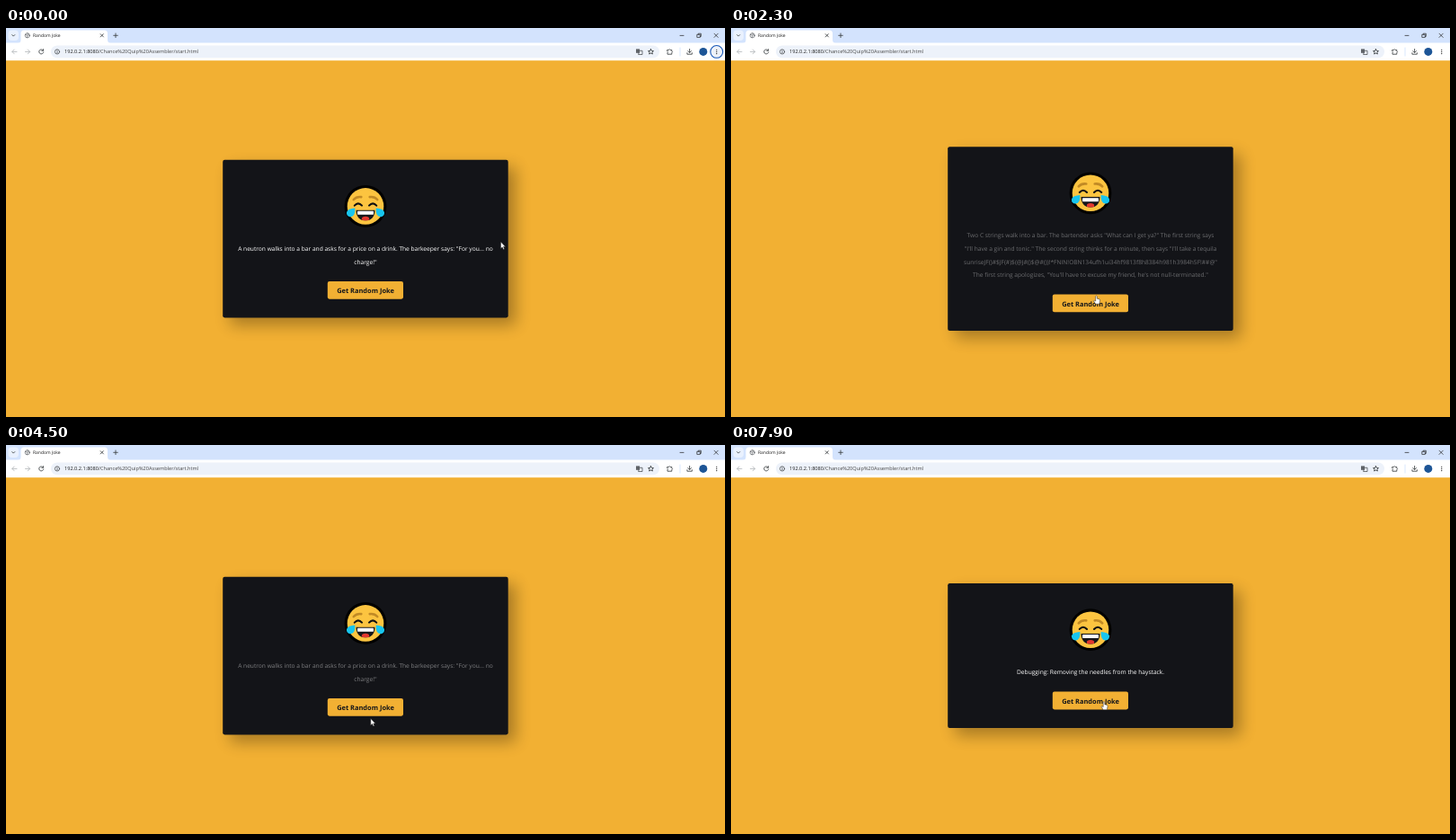
Animation, 800 px wide and 433 px high, one loop 8 s. Source, as an HTML page:

```html
<!DOCTYPE html>
<html lang="en">
<head>
<meta charset="utf-8">
<title>Random Joke</title>
<style>
  html, body { margin: 0; width: 100%; height: 100%; overflow: hidden; background: #f2b033; }
  svg { display: block; width: 100vw; height: 100vh; }
  text { font-family: "Open Sans", "Noto Sans", sans-serif; text-rendering: geometricPrecision; }
  .joke { font-size: 6.63px; fill: #fff; text-anchor: middle; }
  .label { font-size: 7.45px; font-weight: 700; fill: #15161a; text-anchor: middle; }
  .icon { fill: none; stroke: #3c4043; stroke-width: .85; stroke-linecap: round; stroke-linejoin: round; }
</style>
</head>
<body>
<svg viewBox="0 0 800 433" preserveAspectRatio="none">
  <defs>
    <filter id="soft" x="-20%" y="-30%" width="140%" height="160%"><feGaussianBlur stdDeviation="8.3"/></filter>
    <clipPath id="mouthClip"><path d="M389.5 4H410.5C410.5 12 406 16 400 16S389.5 12 389.5 4Z"/></clipPath>
  </defs>
  <rect width="800" height="433" fill="#f2b033"/>

  <!-- Browser window -->
  <rect width="800" height="17" fill="#d3e3fd"/>
  <rect y="16.5" width="800" height="19.7" fill="#fff"/>
  <rect x="2.5" y="2.5" width="11.5" height="11.5" rx="4" fill="#e9f1fe"/>
  <path d="M12.5 17Q16.5 17 16.5 13V6Q16.5 2.5 20 2.5H109.5Q113 2.5 113 6V13Q113 17 117 17Z" fill="#fff"/>
  <text x="30" y="10.4" font-size="5" fill="#1f1f1f">Random Joke</text>
  <rect x="50" y="19.6" width="677" height="13.6" rx="6.8" fill="#edf2fa"/>
  <text x="65" y="28.4" font-size="5.6" fill="#474747"><tspan fill="#1f1f1f">192.0.2.1:8080</tspan>/Chance%20Quip%20Assembler/start.html</text>
  <g class="icon">
    <path d="M6.8 7.6L8.3 9.1L9.8 7.6"/>
    <g stroke="#5f6368" stroke-width=".7"><circle cx="23.8" cy="8.3" r="2.6"/><path d="M21.4 7.5L24 8L23.4 10.6M24 5.8L24.4 7.3L26.2 8.3"/></g>
    <path d="M105.2 6.7L108.4 9.9M108.4 6.7L105.2 9.9M119.7 8.3H124.3M122 6V10.6"/>
    <g stroke="#222" stroke-width=".7">
      <path d="M750 8.4H754M788 6.2L792.2 10.4M792.2 6.2L788 10.4"/>
      <path d="M769.2 7.3H772.3V10.4H769.2ZM770.2 7.2V6.2H773.3V9.4H772.4"/>
    </g>
    <path stroke="#b4b7ba" d="M12 26.4H7M9.2 24L6.8 26.4L9.2 28.8M21.5 26.4H26.5M24.3 24L26.7 26.4L24.3 28.8"/>
    <path d="M41.2 24.8A2.5 2.5 0 1 0 41.7 27M41.6 23.6V25.3H39.8"/>
    <circle cx="57" cy="26.4" r="2.6" stroke-width=".7"/><path stroke-width=".7" d="M57 26.2V27.7M57 25V25.1"/>
    <path d="M705 25.3H708V29.5H704Z" stroke-width=".7"/><rect x="701" y="23.4" width="4.1" height="4.4" fill="#5f6368" stroke="none"/>
    <path d="M717.5 23.5L718.4 25.4L720.5 25.6L718.9 27L719.4 29L717.5 28L715.6 29L716.1 27L714.5 25.6L716.6 25.4Z"/>
    <path d="M736 24.5H737.5Q738.3 22.7 739.1 24.5H740.8V26Q742.4 26.8 740.8 27.6V29.2H736V27.5Q737.4 26.8 736 26Z"/>
    <path d="M750 22V31" stroke="#d3e3fd"/>
    <path d="M760.6 23.4V27.3M758.8 25.6L760.6 27.4L762.4 25.6M757.9 27.7V29.2H763.3V27.7"/>
  </g>
  <circle cx="775.8" cy="26.4" r="4.5" fill="#1d5596"/>
  <circle id="ring" cx="790.7" cy="26.4" r="6.9" fill="#eef2f9" stroke="#1757b8" stroke-width="1.1"/>
  <g fill="#333"><circle cx="790.7" cy="24.3" r=".65"/><circle cx="790.7" cy="26.4" r=".65"/><circle cx="790.7" cy="28.5" r=".65"/></g>

  <!-- Joke card -->
  <rect id="shadow" x="249.5" width="317.5" rx="2" opacity=".3" filter="url(#soft)"/>
  <rect id="card" x="241.2" width="317.5" rx="2.1" fill="#131418"/>
  <g id="emoji">
    <circle cx="400" r="23.4" fill="#000"/>
    <circle cx="400" r="20.3" fill="#fcc440"/>
    <g fill="none" stroke-linecap="round">
      <path d="M386.8 -7.4Q390 -11 395.3 -10.3M404.7 -10.3Q410 -11 413.2 -7.4" stroke="#c18a25" stroke-width="2.6"/>
      <path d="M387.8 -.8Q391.8 -5.2 396 -.8M404 -.8Q408.2 -5.2 412.2 -.8" stroke="#111" stroke-width="2.1"/>
    </g>
    <g clip-path="url(#mouthClip)">
      <rect x="388" y="3" width="24" height="14" fill="#15161a"/>
      <rect x="391" y="5.4" width="18" height="4" rx=".8" fill="#fff"/>
      <ellipse cx="400" cy="14" rx="4.2" ry="2.7" fill="#e2382f"/>
    </g>
    <path id="tear" d="M388.4 2.2Q388.8 11.6 383.2 11.8Q378.4 11.2 379 6.6Q380.4 2.6 388.4 2.2Z" fill="#18c5ee"/>
    <use href="#tear" transform="translate(800) scale(-1 1)"/>
  </g>
  <g id="jokes"></g>
  <g id="button">
    <rect x="357.8" width="84.2" height="19.8" rx="2.1" fill="#f2b033"/>
    <text class="label" x="400" y="13.1">Get Random Joke</text>
  </g>

  <g id="pointer" stroke="#222" stroke-width=".5" fill="#fff" stroke-linejoin="round">
    <path id="arrow" d="M0 0V7.4L1.7 5.9L2.9 8.4L4.1 7.9L3 5.4H5.2Z"/>
    <path id="hand" d="M-.8 .7Q0 -.6 .8 .7V3.2L3.4 3.9Q4.2 4.2 4.1 5.2L3.4 9.2H-.8L-3 5.8Q-2.6 4.7 -.8 6Z"/>
  </g>
</svg>
<script>
const LOOP = 8000, FADE = 1500, LINE = 14.6, MIDDLE = 234.6;
const $ = id => document.getElementById(id);
const set = (id, attrs) => { for (const key in attrs) $(id).setAttribute(key, attrs[key]); };

const neutron = ['A neutron walks into a bar and asks for a price on a drink. The barkeeper says: "For you... no', 'charge!"'];
const strings = [
  'Two C strings walk into a bar. The bartender asks "What can I get ya?" The first string says',
  '"I\'ll have a gin and tonic." The second string thinks for a minute, then says "I\'ll take a tequila',
  'sunriseJF()#$JF(#)$(@J#()$@#())!*FNIN!OBN134ufh1ui34hf9813f8h8384h981h3984h5F!##@"',
  'The first string apologizes, "You\'ll have to excuse my friend, he\'s not null-terminated."'
];
const debugging = ['Debugging: Removing the needles from the haystack.'];

// Each click hides the old joke; the next one fades in when it arrives.
const scenes = [
  { shown: -FADE, click: 1750, lines: neutron },
  { shown: 1950, click: 3850, lines: strings },
  { shown: 4100, click: 6000, lines: neutron },
  { shown: 6240, click: LOOP, lines: debugging }
];

const path = [
  [0, 550.5, 238], [300, 550.5, 238], [1300, 406.5, 298], [2600, 406.5, 298], [3100, 408.5, 302.5],
  [3600, 405.8, 304.5], [5500, 405.8, 304.5], [5900, 411, 290], [7300, 411, 290], [7900, 415, 285.5]
];

for (const scene of scenes) {
  scene.node = document.createElementNS('http://www.w3.org/2000/svg', 'g');
  scene.lines.forEach((line, i) => {
    const text = document.createElementNS('http://www.w3.org/2000/svg', 'text');
    text.setAttribute('class', 'joke');
    text.setAttribute('x', 400);
    text.setAttribute('y', 101.2 + i * LINE);
    text.textContent = line;
    scene.node.append(text);
  });
  $('jokes').append(scene.node);
}

const clamp = x => Math.min(1, Math.max(0, x));

// cubic-bezier(.25, .1, .25, 1)
function ease(x) {
  let low = 0, high = 1;
  for (let i = 0; i < 18; i++) {
    const s = (low + high) / 2;
    const bx = .75 * s * (1 - s) + s ** 3;
    if (bx < x) low = s; else high = s;
  }
  return .3 * low * (1 - low) ** 2 + 3 * low ** 2 * (1 - low) + low ** 3;
}

function pointerAt(t) {
  const i = path.findIndex(p => p[0] > t);
  if (i < 0) return path[path.length - 1].slice(1);
  const [a, b] = [path[i - 1], path[i]];
  const k = clamp((t - a[0]) / (b[0] - a[0]));
  const s = k * k * (3 - 2 * k);
  return [a[1] + (b[1] - a[1]) * s, a[2] + (b[2] - a[2]) * s];
}

function draw(t) {
  const scene = scenes.filter(s => s.shown <= t).pop();
  const height = 161 + LINE * (scene.lines.length - 1);
  const top = MIDDLE - height / 2;
  const buttonY = top + height - 40.5;
  const opacity = t < scene.click ? ease(clamp((t - scene.shown) / FADE)) : 0;

  set('card', { y: top, height });
  set('shadow', { y: top + 8.3, height });
  set('emoji', { transform: `translate(0 ${top + 51.6})` });
  set('jokes', { transform: `translate(0 ${top})` });
  set('button', { transform: `translate(0 ${buttonY})` });
  for (const s of scenes) s.node.setAttribute('opacity', s === scene ? opacity : 0);

  const [x, y] = pointerAt(t);
  const over = x > 357.8 && x < 442 && y > buttonY && y < buttonY + 19.8;
  set('pointer', { transform: `translate(${x} ${y})` });
  set('arrow', { visibility: over ? 'hidden' : 'visible' });
  set('hand', { visibility: over ? 'visible' : 'hidden' });
  set('ring', { opacity: 1 - clamp((t - 850) / 200) });
}

const start = performance.now();
function tick() {
  draw((performance.now() - start) % LOOP);
  requestAnimationFrame(tick);
}
tick();
</script>
</body>
</html>
```
